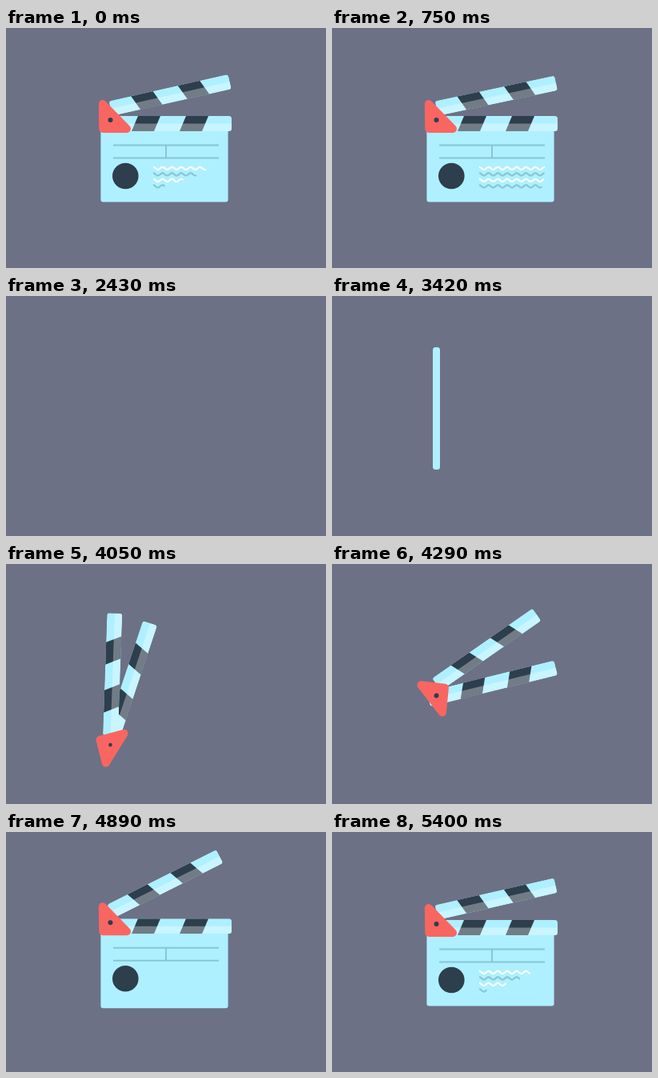
Recreate the animation shown at these times as an HTML page with a canvas. Size 400 by 300 pixels, loop 5430 ms.

```html
<!DOCTYPE html>
<html lang="en">
<head>
<meta charset="utf-8">
<title>Clapperboard</title>
<style>
html, body { margin: 0; width: 100%; height: 100%; overflow: hidden; background: #6c7186; }
canvas { display: block; width: 400px; height: 300px; }
</style>
</head>
<body>
<canvas id="c" width="400" height="300"></canvas>
<script>
const ctx = document.getElementById('c').getContext('2d');
const LOOP = 5430, CUT = 2355, PX = 130.5, BODY = 88.5;
const BG = '#6c7186', CYAN = '#aef0ff', DARK = '#2d3e4d', RED = '#f96662', RULE = '#88c6d3';

const clamp = v => Math.max(0, Math.min(1, v));
const span = (s, from, to) => clamp((s - from) / (to - from));
const smooth = (s, from, to) => { const u = span(s, from, to); return u * u * (3 - 2 * u); };
const easeOut = u => 1 - (1 - u) ** 3;
const backOut = u => 1 + 2.2 * (u - 1) ** 3 + 1.2 * (u - 1) ** 2;
const rad = d => d * Math.PI / 180;

// Damped step from 0 to 1; peaks after half a swing
function spring(t, half) {
  if (t <= 0) return 0;
  const x = t / half * Math.PI;
  return 1 - Math.exp(-.8 * x) * (Math.cos(x) + .8 * Math.sin(x));
}

const bodyHeight = s => BODY * spring(s - 4380, 397);
const drop = s => 79 * (1 - smooth(s, 4010, 4400));
const barAngle = s => -90 + 90 * smooth(s, 3900, 4420);
const hingeAngle = s => -360 + 360 * smooth(s, 3722, 4833);

// Swing open, bounce wider, fall back, then sag slowly
const armAngle = s => -90 + 72 * smooth(s, 4010, 4420) - 9.5 * smooth(s, 4420, 4700)
  + 14.8 * smooth(s, 4800, 5440) + 2 * span(s, 5400, 7785);

function line(x1, y1, x2, y2) {
  ctx.beginPath();
  ctx.moveTo(x1, y1);
  ctx.lineTo(x2, y2);
  ctx.stroke();
}

function dot(x, y, r, color) {
  ctx.fillStyle = color;
  ctx.beginPath();
  ctx.arc(x, y, Math.max(0, r), 0, 7);
  ctx.fill();
}

// Striped stick along +x from its base; lean shifts the lower edge of each stripe
function stick(x, y, angle, len, thick, first, lean, paint) {
  const half = thick / 2;
  ctx.save();
  ctx.translate(x, y);
  ctx.rotate(rad(angle));
  ctx.beginPath();
  ctx.roundRect(0, -half, len, thick, 3.5);
  ctx.clip();
  ctx.fillStyle = CYAN;
  ctx.fillRect(0, -half, len, thick);
  ctx.fillStyle = DARK;
  for (let i = 0; i < 2; i++) {
    const a = first + 60 * i, w = 28 * paint;
    ctx.beginPath();
    ctx.moveTo(a, -half);
    ctx.lineTo(a + w, -half);
    ctx.lineTo(a + w + lean, half);
    ctx.lineTo(a + lean, half);
    ctx.fill();
  }
  ctx.fillStyle = `rgba(255,255,255,${.32 * paint})`;
  ctx.fillRect(0, 0, len, half);
  ctx.restore();
}

function hinge(s, y) {
  const scale = backOut(span(s, 3750, 3960));
  if (scale <= 0) return;
  ctx.save();
  ctx.translate(PX, y);
  ctx.rotate(rad(hingeAngle(s)));
  ctx.scale(scale, scale);
  ctx.fillStyle = ctx.strokeStyle = RED;
  ctx.lineWidth = 10;
  ctx.lineJoin = 'round';
  ctx.beginPath();
  ctx.moveTo(-9.7, -20);
  ctx.lineTo(-9.2, 11);
  ctx.lineTo(20.5, 11);
  ctx.closePath();
  ctx.fill();
  ctx.stroke();
  dot(0, 0, 3 * easeOut(span(s, 3900, 4300)), DARK);
  ctx.restore();
}

function wave(y, len, color) {
  if (len <= 0) return;
  ctx.strokeStyle = color;
  ctx.lineWidth = 2.2;
  ctx.beginPath();
  for (let x = 0; x <= len; x += .5)
    ctx.lineTo(184 + x, y - 1.6 * Math.cos(x / 11.7 * 2 * Math.PI));
  ctx.stroke();
}

function board(s, py, h) {
  if (h <= 0) return;
  ctx.save();
  ctx.beginPath();
  ctx.roundRect(118.4, py + 13, 159.2, h + 1, [0, 0, 3, 3]);
  ctx.clip();
  ctx.fillStyle = CYAN;
  ctx.fillRect(118, py + 12, 160, h + 3);
  ctx.translate(0, py - 115);

  ctx.strokeStyle = RULE;
  ctx.lineWidth = 2;
  for (let i = 0; i < 2; i++) {
    const y = 146.5 + 16 * i, w = 66 * smooth(s, 4480 + 70 * i, 4800 + 70 * i);
    if (w > 0) line(200 - w, y, 200 + w, y);
  }
  const v = easeOut(span(s, 4680, 4900));
  if (v > 0) line(200, 147, 200, 147 + 15.5 * v);

  const pop = span(s, 4600, 4880);
  if (pop > 0) dot(149.3, 185, 16.3 * backOut(pop), DARK);

  for (let i = 0; i < 4; i++) {
    const start = 4900 + 150 * i;
    wave(175.4 + 7.5 * i, 82 * easeOut(span(s, start, start + 1250)), i % 2 ? RULE : '#fff');
  }
  ctx.restore();
}

function draw(t) {
  const s = t < CUT ? t + LOOP : t;
  ctx.fillStyle = BG;
  ctx.fillRect(0, 0, 400, 300);

  if (s < 3400) {
    const len = 153 * smooth(s, 2950, 3380);
    ctx.fillStyle = CYAN;
    ctx.beginPath();
    ctx.roundRect(126, 139.5 - len / 2, 9, len, 3);
    ctx.fill();
    return;
  }

  const h = bodyHeight(s), bar = barAngle(s), arm = armAngle(s);
  const py = 115 + .39 * (BODY - h) + drop(s);
  const paint = easeOut(span(s, 3600, 3860));
  const thick = 9 + 10 * smooth(s, 3420, 3660);

  board(s, py, h);
  if (s > 3880)
    stick(PX - 12.5 - 11 * Math.sin(rad(bar)), py + 3 + 1.5 * Math.cos(rad(bar)), bar, 164, 19, 47, -8, paint);
  stick(PX, py - 11.5 - 2.9 * Math.cos(rad(arm)), arm, 153, thick, 28.5, 8, paint);
  hinge(s, py);
}

const t0 = performance.now();
function tick() {
  draw((performance.now() - t0) % LOOP);
  requestAnimationFrame(tick);
}
tick();
</script>
</body>
</html>
```
